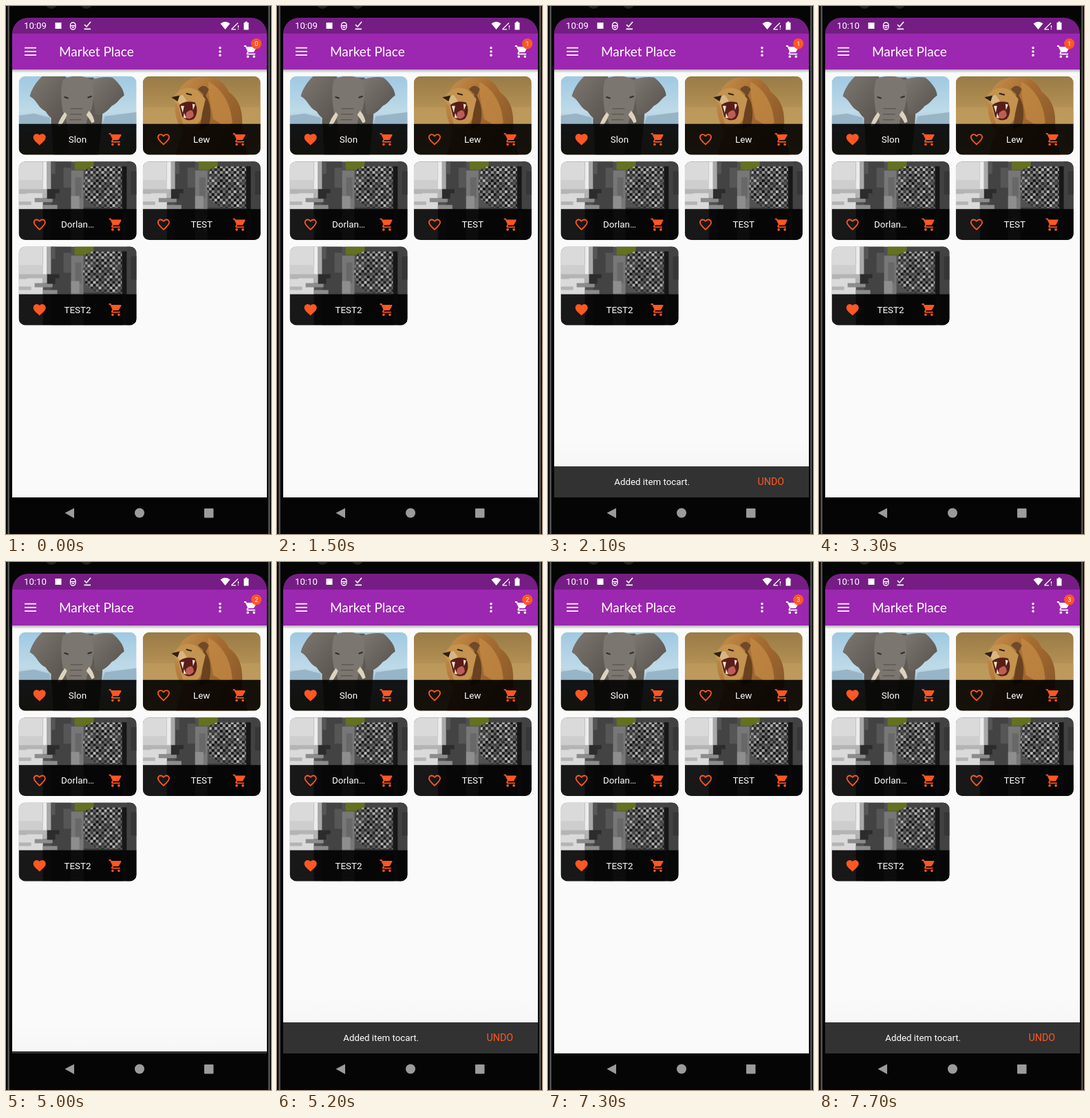
An HTML page for the animation above (8000 ms loop, 385x765 px).

```html
<!DOCTYPE html>
<html lang="en">
<head>
<meta charset="utf-8">
<title>Market Place</title>
<style>
  html, body { margin: 0; width: 100%; height: 100%; overflow: hidden; background: #000; }
  svg { display: block; width: 385px; height: 765px; }
  text { font-family: Roboto, "Noto Sans", sans-serif; fill: #fff; }
  .title { font: 19px Lato, "Open Sans", sans-serif; }
  .label { font-size: 13.4px; text-anchor: middle; }
  .note { font-size: 13.3px; }
  .undo { font-size: 14.3px; fill: #ff5722; }
  .clock { font-size: 13.2px; }
  .count { font-size: 9px; text-anchor: middle; }
</style>
</head>
<body>
<svg viewBox="0 0 385 765">
  <defs>
    <linearGradient id="sky" x2="0" y2="1">
      <stop offset="0" stop-color="#9fc9e2"/><stop offset=".45" stop-color="#bfdae8"/>
      <stop offset=".6" stop-color="#a9c4d6"/><stop offset="1" stop-color="#a39a70"/>
    </linearGradient>
    <linearGradient id="hide" x2="1" y2="1">
      <stop offset="0" stop-color="#7d7771"/><stop offset="1" stop-color="#57524d"/>
    </linearGradient>
    <linearGradient id="savanna" x2="0" y2="1">
      <stop offset="0" stop-color="#9a7b46"/><stop offset=".4" stop-color="#b39054"/>
      <stop offset="1" stop-color="#c2a062"/>
    </linearGradient>
    <linearGradient id="mane" x2="1" y2=".6">
      <stop offset="0" stop-color="#c8924c"/><stop offset=".5" stop-color="#a56c31"/>
      <stop offset="1" stop-color="#8a5829"/>
    </linearGradient>
    <linearGradient id="drop" x2="0" y2="1">
      <stop offset="0" stop-opacity=".28"/><stop offset="1" stop-opacity="0"/>
    </linearGradient>
    <linearGradient id="rise" x2="0" y2="1">
      <stop offset="0" stop-opacity="0"/><stop offset="1" stop-opacity=".014"/>
    </linearGradient>
    <linearGradient id="edge">
      <stop offset="0" stop-color="#161616"/><stop offset=".5" stop-color="#6a6a6a"/>
      <stop offset="1" stop-color="#111"/>
    </linearGradient>
    <clipPath id="tileClip"><rect width="171" height="113.8" rx="9.5"/></clipPath>
    <clipPath id="bodyClip"><rect x="9" y="92" width="370" height="620"/></clipPath>
    <clipPath id="meshClip"><path d="M98 11L107 7H150V68H114L97 54L93 38Z"/></clipPath>

    <path id="heart" d="M12 21.35l-1.45-1.32C5.4 15.36 2 12.28 2 8.5 2 5.42 4.42 3 7.5 3c1.74 0 3.41.81 4.5 2.09C13.09 3.81 14.76 3 16.5 3 19.58 3 22 5.42 22 8.5c0 3.78-3.4 6.86-8.55 11.54z"/>
    <path id="heartLine" fill="none" stroke="#ff5722" stroke-width="2" d="M12 20L11.2 19.3C6.2 14.8 3 11.9 3 8.5 3 5.9 5 4 7.5 4c1.8 0 3.4 1 4.1 2.4h.8C13.1 5 14.7 4 16.5 4 19 4 21 5.9 21 8.5c0 3.4-3.2 6.3-8.2 10.8z"/>
    <path id="cart" d="M7 18c-1.1 0-2 .9-2 2s.9 2 2 2 2-.9 2-2-.9-2-2-2zM1 2v2h2l3.6 7.59-1.35 2.45C4.3 15.3 5.3 17 7 17h12v-2H7.42c-.2 0-.3-.2-.22-.37l.9-1.63h7.45c.75 0 1.41-.41 1.75-1.03l3.58-6.49C21.25 4.8 20.8 4 20 4H5.21l-.94-2zM17 18c-1.1 0-2 .9-2 2s.9 2 2 2 2-.9 2-2-.9-2-2-2z"/>

    <g id="elephant">
      <rect width="171" height="114" fill="url(#sky)"/>
      <path d="M0 57L22 54L45 60V76H0ZM125 58L171 52V76H120Z" fill="#98b5c8"/>
      <path d="M48 76C44 58 52 14 66 2H108C126 20 122 52 120 76L116 114H50Z" fill="#5f5a54"/>
      <path d="M68 0H34C25 8 18 20 16 29C26 34 28 46 39 51C46 62 54 66 60 65C70 50 74 20 68 0Z" fill="url(#hide)"/>
      <path d="M105 5C115 2 127 0 136 2C146 10 153 20 153 28C147 31 143 40 135 43C126 54 116 59 111 54Z" fill="url(#hide)"/>
      <path d="M64 5Q84-6 105 5Q112 26 105 50Q96 60 93 114H72Q73 64 64 52Q59 24 64 5Z" fill="#7c7670"/>
      <path d="M75 47H93M74 55H92M74 63H91" stroke="#5f5953" stroke-width="1.5"/>
      <path d="M67 52Q60 60 56 72L60 73Q66 66 70 56ZM102 50Q108 56 110 66L106 68Q103 62 98 56Z" fill="#ddd2bd"/>
      <path d="M66 30l6 2M100 31l6-2" stroke="#302c29" stroke-width="2"/>
    </g>

    <g id="lion">
      <rect width="171" height="114" fill="url(#savanna)"/>
      <path d="M0 45H171V72H0Z" fill="#c49f62" opacity=".55"/>
      <path d="M50 26C57 8 70 0 91 1C109 1 119 10 125 23C141 34 146 52 144 75L152 114H48L57 78C46 62 44 42 50 26Z" fill="url(#mane)"/>
      <path d="M95 8C110 15 128 34 130 68L118 72L102 62C100 44 94 30 95 8Z" fill="#c48a44" opacity=".75"/>
      <path d="M88 24C98 34 101 54 96 72L82 78L86 58Z" fill="#57351a" opacity=".75"/>
      <path d="M47 27C53 18 67 13 80 21L91 33L84 63C77 75 63 77 58 69L51 43L44 34Z" fill="#c3934f"/>
      <path d="M45 31L58 27L64 36L54 41Z" fill="#d8b681"/>
      <path d="M53 42Q62 34 76 38Q82 52 74 62Q64 67 57 58Z" fill="#591d18"/>
      <path d="M63 53Q73 44 74 57Q69 64 62 60Z" fill="#bd5e56"/>
      <path d="M55 43l3 10 2-10M72 40l1 9 3-8M59 60l1-7 3 8" fill="#f2e6ce"/>
      <path d="M44 31l8-2-2 6zM63 25l8 2" fill="#302015" stroke="#302015" stroke-width="2"/>
      <path d="M80 19Q88 9 96 19L91 29Z" fill="#70492a"/>
    </g>

    <g id="blocks">
      <rect width="171" height="114" fill="#515151"/>
      <rect width="35" height="114" fill="#dadada"/>
      <path d="M0 27H35V40H0Z" fill="#cecece"/>
      <path d="M35 0H41V45H35Z" fill="#ececec"/>
      <path d="M41 0H47V53H41Z" fill="#a8a8a8"/>
      <path d="M47 0H76V114H47Z" fill="#434343"/>
      <path d="M47 0H53V18H47ZM65 9H76V38H65Z" fill="#565656"/>
      <path d="M0 40H12V47H0ZM12 40H43V53H35V46H12ZM0 58H18V63H0Z" fill="#b4b4b4"/>
      <path d="M23 53H49V59H23ZM35 63H56V69H35Z" fill="#8c8c8c"/>
      <path d="M41 40H59V46H53V54H41Z" fill="#2c2c2c"/>
      <path d="M76 13H94V114H76Z" fill="#777"/>
      <path d="M82 23H91V53H82Z" fill="#686868"/>
      <path d="M76 50H88V68H76Z" fill="#8e8e8e"/>
      <path d="M81 0H109V12H81Z" fill="#657020"/>
      <path d="M109 0H171V8H109Z" fill="#454545"/>
      <g id="mesh" clip-path="url(#meshClip)"></g>
      <path d="M150 7H157V70H150Z" fill="#171717"/>
      <path d="M157 0H171V114H157Z" fill="#424242"/>
      <path d="M163 14H171V48H163Z" fill="#363636"/>
      <path d="M94 67H151V114H94Z" fill="#383838"/>
    </g>
  </defs>

  <rect width="385" height="765" fill="#050505"/>
  <circle cx="66" cy="-5" r="9" fill="#242424"/>
  <circle cx="117" cy="-5" r="9" fill="#242424"/>
  <rect x="2" width="3.5" height="765" fill="url(#edge)"/>
  <rect x="380.5" width="3.5" height="765" fill="url(#edge)"/>

  <path d="M9 40A23 23 0 0 1 32 17H356A23 23 0 0 1 379 40Z" fill="#751d84"/>
  <rect x="9" y="92" width="370" height="620" fill="#fafafa"/>
  <rect x="9" y="40" width="370" height="52" fill="#9c27b0"/>
  <rect x="9" y="92" width="370" height="5" fill="url(#drop)"/>

  <text id="clock" class="clock" x="26" y="33"></text>
  <g fill="#fff">
    <rect x="71.5" y="24" width="9" height="9"/>
    <path d="M311.5 25.5Q318.5 20 325.5 25.5L318.500 34Z"/>
    <path d="M345.500 24h2v-1.500h3V24h2v10.500h-7z"/>
    <circle cx="311" cy="60.600" r="1.800"/><circle cx="311" cy="66" r="1.800"/><circle cx="311" cy="71.400" r="1.800"/>
    <path d="M27 59.800h17v1.800H27zM27 65h17v1.800H27zM27 70.200h17V72H27z"/>
    <use href="#cart" transform="translate(345 55.300) scale(.9)"/>
  </g>
  <g fill="none" stroke="#fff" stroke-width="1.300">
    <rect x="93.500" y="24" width="7.500" height="10" rx="3.500"/>
    <path d="M93.500 28.500h7.500M95.500 31h3.500"/>
    <path d="M114 27l3 3 6-7M113.500 33.300h9.500" stroke-width="1.700"/>
    <path d="M327.500 33.800L337 24.500M327.500 33.800h6.500M337.500 28v3.500M337.500 32.800v1.300"/>
  </g>
  <text class="title" x="77" y="73">Market Place</text>
  <circle cx="363.700" cy="54.600" r="7.600" fill="#ff5722"/>
  <text id="count" class="count" x="363.700" y="58"></text>

  <g id="tiles"></g>

  <g clip-path="url(#bodyClip)">
    <g id="snack">
      <rect x="9" y="627" width="370" height="40" fill="url(#rise)"/>
      <rect x="9" y="667" width="370" height="45" fill="#323232"/>
      <text class="note" x="96.300" y="694">Added item tocart.</text>
      <text class="undo" x="304.500" y="694.300">UNDO</text>
    </g>
  </g>

  <g fill="#9b9b9b">
    <path d="M85.500 734.500L99 727.500V742Z"/>
    <circle cx="194" cy="734.500" r="7"/>
    <rect x="288" y="728" width="13.500" height="13.500" rx="1"/>
  </g>
</svg>
<script>
const LOOP = 8000, STEP = 100, SLIDE = 250, BAR = 45;
const $ = id => document.getElementById(id);

// Grey mesh of alternating light and dark cells
let seed = 17;
const random = () => (seed = seed * 16807 % 2147483647) / 2147483647;
let mesh = "";
for (let row = 0; row < 16; row++) {
  for (let col = 0; col < 15; col++) {
    const v = Math.round((row + col) % 2 ? 85 + random() * 105 : 18 + random() * 45);
    mesh += `<rect x="${92 + col * 4}" y="${6 + row * 4}" width="4.1" height="4.1" fill="rgb(${v},${v},${v})"/>`;
  }
}
$("mesh").innerHTML = mesh;

const items = [
  ["Slon", "elephant", true],
  ["Lew", "lion", false],
  ["Dorlan…", "blocks", false],
  ["TEST", "blocks", false],
  ["TEST2", "blocks", true]
];
$("tiles").innerHTML = items.map(([name, picture, liked], i) => {
  const x = 18.6 + i % 2 * 180.2;
  const y = 101.8 + Math.floor(i / 2) * 123.4;
  return `<g transform="translate(${x} ${y})">
    <g clip-path="url(#tileClip)">
      <use href="#${picture}"/>
      <rect y="69" width="171" height="45" fill="#000" fill-opacity=".89"/>
    </g>
    <g fill="#ff5722">
      <use href="#${liked ? "heart" : "heartLine"}" transform="translate(19.3 80.7) scale(.9)"/>
      <use href="#cart" transform="translate(130 80.7) scale(.9)"/>
    </g>
    <text class="label" x="85.4" y="96">${name}</text>
  </g>`;
}).join("");

// cubic-bezier(.4, 0, .2, 1)
function ease(x) {
  if (x <= 0) return 0;
  if (x >= 1) return 1;
  let lo = 0, hi = 1;
  for (let i = 0; i < 24; i++) {
    const s = (lo + hi) / 2, r = 1 - s;
    if (1.2 * r * r * s + .6 * r * s * s + s ** 3 < x) lo = s; else hi = s;
  }
  return 3 * (1 - lo) * lo * lo + lo ** 3;
}

// Start times of each slide in and out
const slides = [[1790, 2960], [4960, 6990], [7460, Infinity]];
const counts = [[7200, 3], [5000, 2], [1500, 1], [0, 0]];

function draw(time) {
  const t = Math.floor(time / STEP) * STEP;
  let shown = 0, active = false;
  for (const [enter, leave] of slides) {
    if (t < enter || t >= leave + SLIDE) continue;
    active = true;
    shown = ease(t < leave ? (t - enter) / SLIDE : 1 - (t - leave) / SLIDE);
  }
  $("snack").setAttribute("visibility", active ? "visible" : "hidden");
  $("snack").setAttribute("transform", `translate(0 ${Math.round((1 - shown) * BAR)})`);
  $("clock").textContent = t < 2700 ? "10:09" : "10:10";
  $("count").textContent = counts.find(([from]) => t >= from)[1];
}

const start = performance.now();
function tick() {
  draw((performance.now() - start) % LOOP);
  requestAnimationFrame(tick);
}
tick();
</script>
</body>
</html>
```
